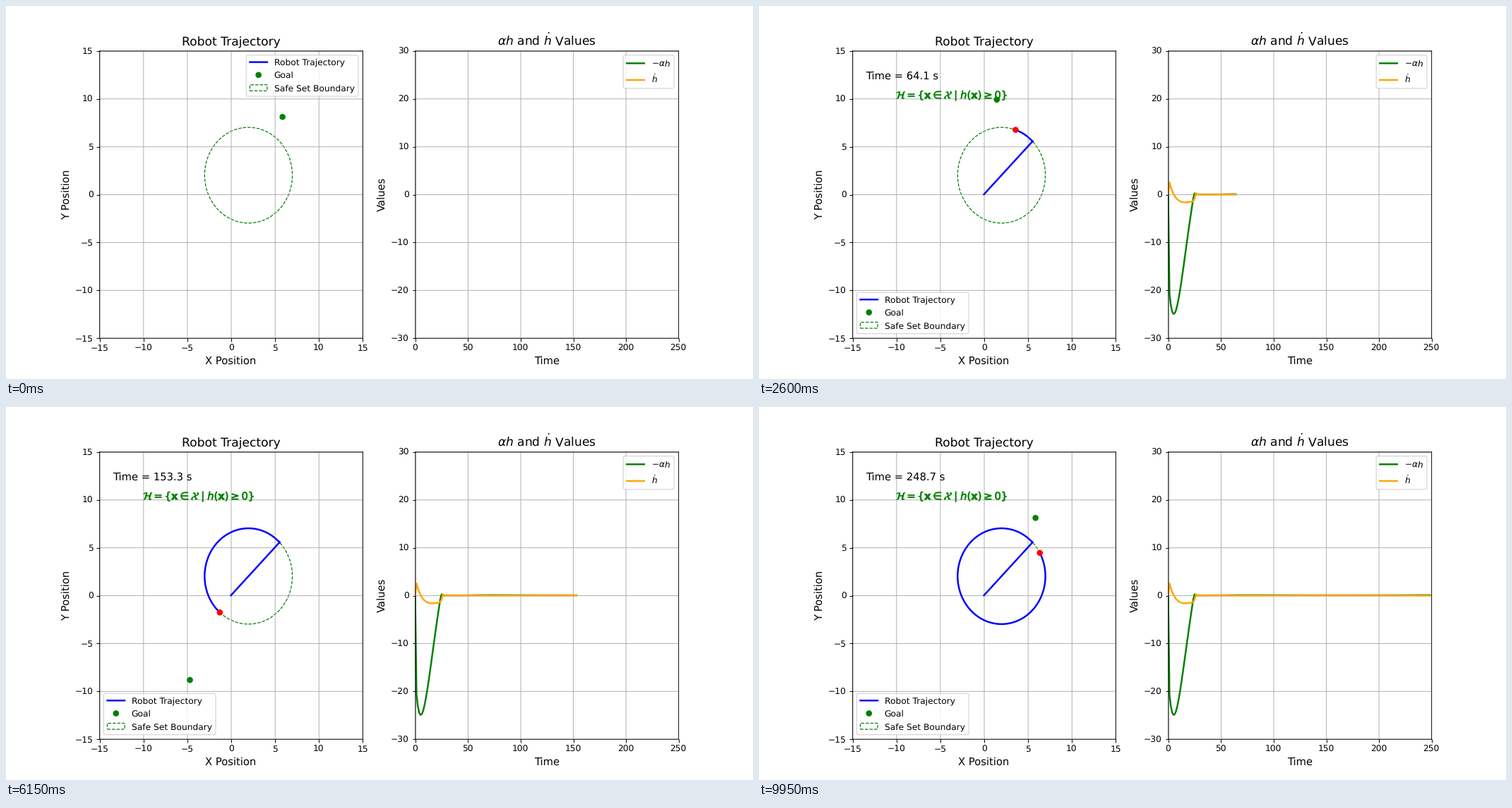
A matplotlib script that plays this animation: 1058 by 529 pixels, repeating every 10 s.

```python
import numpy as np
import matplotlib.pyplot as plt
from matplotlib.animation import FuncAnimation
from matplotlib.patheffects import Normal, Stroke

FRAMES = 200
GAIN, ALPHA, RADIUS = 0.06, 1.0, 5.0
CENTER = np.array([2.0, 2.0])

times = np.linspace(0, 250, FRAMES)
dt = times[1]

# The goal waits at 45 degrees, then circles the origin once per 200 s.
goal_angle = np.pi / 4 + 2 * np.pi / 200 * np.maximum(times - 43.75, 0)
goals = 10 * np.column_stack([np.cos(goal_angle), np.sin(goal_angle)])


def simulate():
    """Proportional control towards the goal, filtered by a barrier function."""
    path = np.zeros((FRAMES, 2))
    neg_alpha_h, h_dot = np.zeros(FRAMES), np.zeros(FRAMES)
    for n in range(FRAMES - 1):
        offset = path[n] - CENTER
        h = RADIUS ** 2 - offset @ offset
        gradient = -2 * offset
        control = GAIN * (goals[n] - path[n])
        shortfall = -ALPHA * h - gradient @ control
        if shortfall > 0:
            control = control + shortfall * gradient / (gradient @ gradient)
        path[n + 1] = path[n] + control * dt
        offset = path[n + 1] - CENTER
        neg_alpha_h[n + 1] = -ALPHA * (RADIUS ** 2 - offset @ offset)
        h_dot[n + 1] = -2 * offset @ control
    return path, neg_alpha_h, h_dot


path, neg_alpha_h, h_dot = simulate()

# Unhinted text and unsnapped lines keep fractional pixel positions.
plt.rcParams.update({
    "font.family": "DejaVu Sans",
    "text.hinting": "no_hinting",
    "path.snap": False,
    "legend.labelspacing": 0.54,
    "legend.borderpad": 0.42,
})
fig, (ax_map, ax_values) = plt.subplots(1, 2, figsize=(12, 6), dpi=1058 / 12)


def style(ax, title, xlabel, ylabel, xlim, ylim):
    ax.set_title(title, fontsize=14)
    ax.set_xlabel(xlabel, fontsize=12)
    ax.set_ylabel(ylabel, fontsize=12)
    ax.set_xlim(xlim)
    ax.set_ylim(ylim)
    ax.grid(True)
    thin_lines = list(ax.spines.values())
    for axis in (ax.xaxis, ax.yaxis):
        thin_lines += list(axis.get_gridlines()) + list(axis.get_ticklines())
    for line in thin_lines:
        line.set_path_effects([Stroke(offset=(0.36, -0.36))])


style(ax_map, "Robot Trajectory", "X Position", "Y Position", (-15, 15), (-15, 15))
style(ax_values, r"$\alpha h$ and $\dot{h}$ Values", "Time", "Values",
      (0, 250), (-30, 30))

trail, = ax_map.plot([], [], "b-", lw=2, label="Robot Trajectory")
robot, = ax_map.plot([], [], "ro", path_effects=[Normal()])
goal, = ax_map.plot([], [], "go", label="Goal", path_effects=[Normal()])
ax_map.add_patch(plt.Circle(CENTER, RADIUS, color="green", fill=False,
                            linestyle="dashed", label="Safe Set Boundary"))
alpha_line, = ax_values.plot([], [], color="green", lw=2, label=r"$-\alpha h$")
dot_line, = ax_values.plot([], [], color="orange", lw=2, label=r"$\dot{h}$")

start_legend = ax_map.legend(loc="upper right")
ax_map.add_artist(start_legend)
run_legend = ax_map.legend(loc="lower left")
ax_values.legend(loc="upper right")

clock = ax_map.text(-13.5, 12, "", fontsize=12)
formula = ax_map.text(
    -10, 10,
    r"$\mathcal{H} = \{\mathbf{x} \in \mathcal{X} \mid h(\mathbf{x}) \geq 0\}$",
    fontsize=12, color="green")


def update(frame):
    n = frame - 1
    running = frame > 0
    shown = slice(0, frame)
    trail.set_data(path[shown, 0], path[shown, 1])
    alpha_line.set_data(times[shown], neg_alpha_h[shown])
    dot_line.set_data(times[shown], h_dot[shown])
    now = n if running else FRAMES - 2
    goal.set_data([goals[now, 0]], [goals[now, 1]])
    robot.set_data([path[now, 0]], [path[now, 1]])
    clock.set_text(f"Time = {times[n]:.1f} s")
    # The formula's edges thicken quickly, then level off.
    edge = 0.65 * max(n, 0) / (frame + 4)
    formula.set_path_effects([Stroke(linewidth=edge, foreground="green")])
    for artist in (robot, clock, formula, run_legend):
        artist.set_visible(running)
    start_legend.set_visible(not running)
    return []


anim = FuncAnimation(fig, update, frames=FRAMES, interval=50,
                     init_func=lambda: update(0), repeat=True, repeat_delay=0)
plt.show()
```
